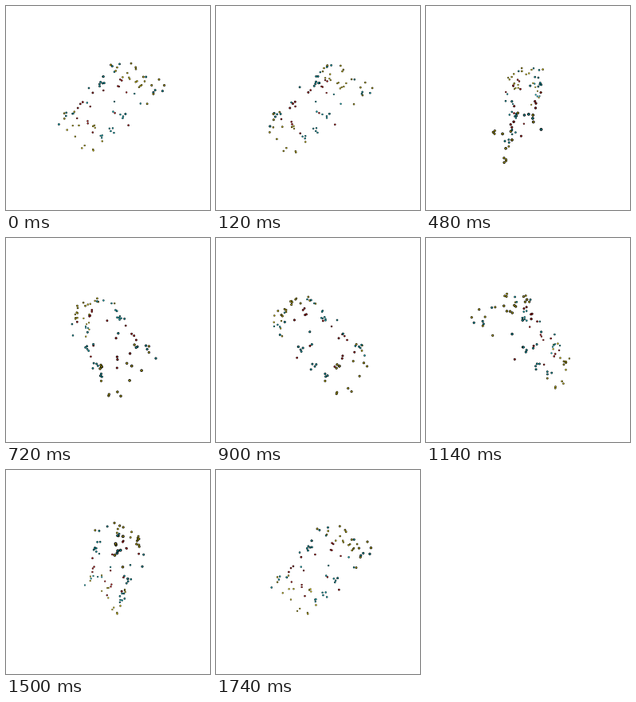
Write a matplotlib script that moves like this. It is 256x256 px and loops after 1800 ms.

```python
import numpy as np
import matplotlib.pyplot as plt
from matplotlib.animation import FuncAnimation

SIZE, DPI, FRAMES, STEP_MS = 256, 64, 30, 60
CAMERA = 230
PT = 72 / DPI
COLORS = {"y": "#f0dc00", "c": "#00ccd8", "r": "#d81414"}

# Clusters: colour of each dot, then x, y, z of the first one
CLUSTERS = [
    ("y", 28, -54, 8), ("c", 14, -53, 9), ("cy", 5, -49, 15),
    ("yyc", 10, -48, -7), ("cc", -6, -38, 8), ("yy", 34, -50, 5),
    ("yy", 20, -42, -20), ("yy", 30, -40, -23), ("yy", 39, -36, -16),
    ("yyyy", 44, -30, -10), ("yc", 42, -37, 12), ("y", 59, -33, 18),
    ("y", 62, -25, 28), ("c", 61, -19, 25), ("y", 50, -26, 20),
    ("ccy", 52, -18, 20), ("y", 47, -5, 10), ("c", 44, -6, -18),
    ("c", 37, -20, -26), ("r", 26, -22, -28), ("rr", 18, -36, -10),
    ("rr", 15, -29, -18), ("r", -6, -23, -10), ("r", -18, -18, 13),
    ("c", -24, -25, 0), ("ccccc", -10, -28, 15), ("c", 9, -9, -28),
    ("cr", 7, 5, -20), ("c", 17, 9, -23), ("cccc", 23, 8, -14),
    ("r", 26, 22, -3), ("rrr", -34, -5, 5), ("rc", -24, -2, -18),
    ("ycc", -45, 5, -15), ("ccyy", -53, 10, -1), ("c", -60, 20, 6),
    ("y", -56, 30, -21), ("y", -50, 25, -30), ("r", -42, 14, -19),
    ("y", -40, 24, -22), ("rr", -28, 18, -22), ("yyyy", -22, 27, -41),
    ("r", -20, 32, -10), ("y", -46, 40, -27), ("yy", -33, 53, -29),
    ("yy", -21, 58, -27), ("y", -8, 46, -24), ("ccc", -8, 38, -24),
    ("cccc", 2, 28, -20),
]


def build_cloud():
    rng = np.random.default_rng(4)
    points, colors = [], []
    for kinds, *center in CLUSTERS:
        for i, kind in enumerate(kinds):
            shift = rng.normal(0, 2.7, 3) if i else np.zeros(3)
            points.append(center + shift)
            colors.append(COLORS[kind])
    return np.array(points).T, np.array(colors)


(X, Y, Z), colors = build_cloud()

fig = plt.figure(figsize=(SIZE / DPI, SIZE / DPI), dpi=DPI, facecolor="white")
ax = fig.add_axes([0, 0, 1, 1])
ax.set(xlim=(0, SIZE), ylim=(SIZE, 0))
ax.axis("off")
dots = ax.scatter(X, Y, edgecolors="black")


def update(frame):
    turn = 2 * np.pi * frame / FRAMES
    across = X * np.cos(turn) + Z * np.sin(turn)
    depth = X * np.sin(turn) - Z * np.cos(turn)
    scale = CAMERA / (CAMERA + depth)
    order = np.argsort(-depth)
    screen = SIZE / 2 + np.column_stack([across * scale, Y * scale])
    near = scale[order]
    dots.set_offsets(screen[order])
    dots.set_sizes((2.0 * PT * near) ** 2)
    dots.set_linewidths(0.6 * PT * near ** 2)
    dots.set_facecolors(colors[order])
    return (dots,)


anim = FuncAnimation(fig, update, frames=FRAMES, interval=STEP_MS,
                     repeat=True, repeat_delay=0)
plt.show()
```
